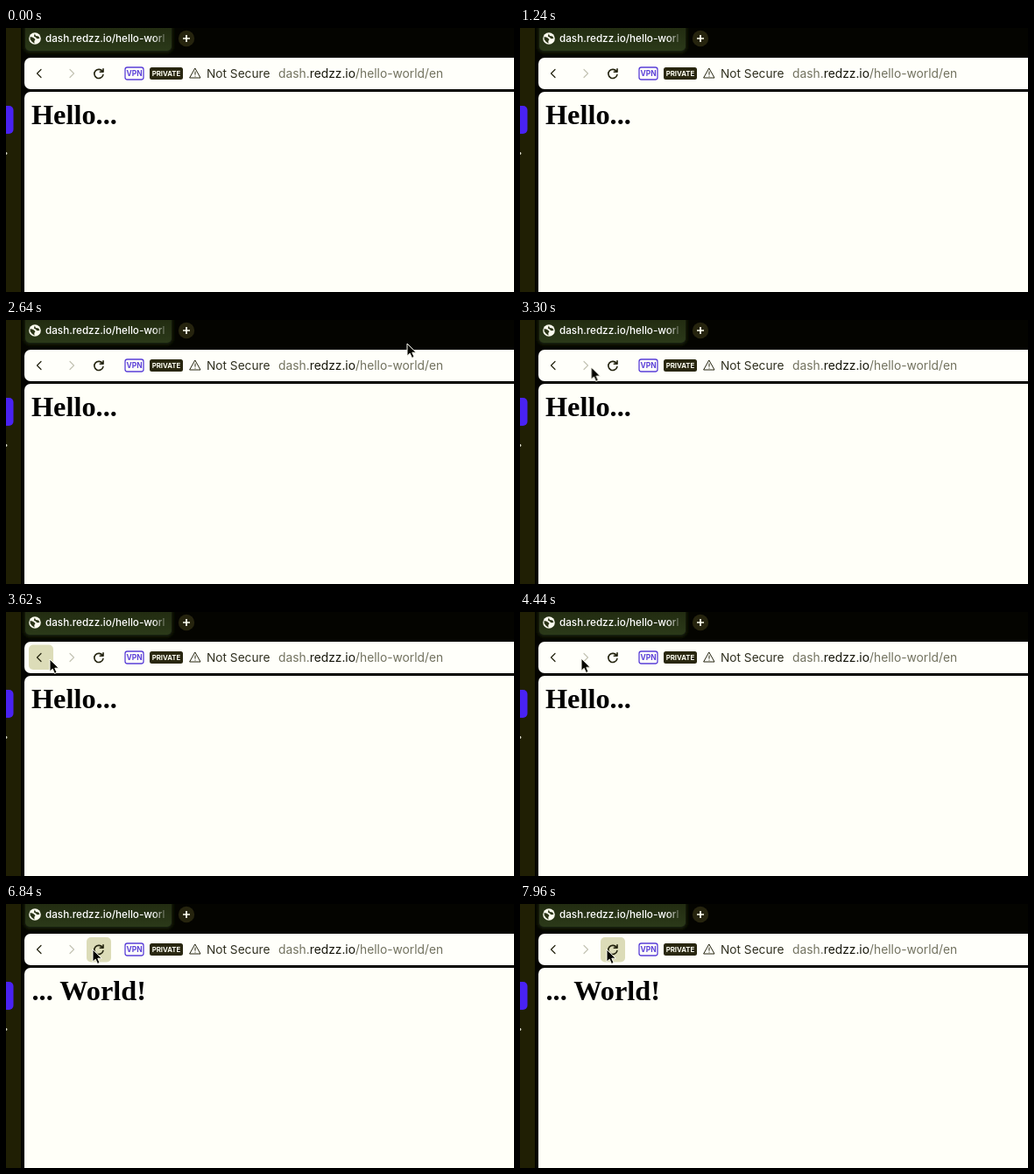
Animation of 580x302 px, one loop 8000 ms. Source, as an HTML page:

```html
<!DOCTYPE html>
<html lang="en">
<head>
<meta charset="utf-8">
<title>Hello World</title>
<style>
  html, body { margin: 0; width: 100%; height: 100%; overflow: hidden; background: #040400; }
  svg { display: block; width: 580px; height: 302px; }
  text { font-family: Inter, sans-serif; white-space: pre; }
  .heading { font: bold 32.3px "Liberation Serif", serif; }
  .line { fill: none; stroke: #24240f; stroke-width: 1.2; stroke-linecap: round; stroke-linejoin: round; }

  .hello, .world, .back, .reload, .cursor { animation: 8s step-end infinite; }
  .hello { animation-name: hello; }
  .world { animation-name: world; }
  .back { animation-name: back; }
  .reload { animation-name: reload; }
  .cursor { animation-name: cursor; animation-timing-function: linear; }

  @keyframes hello { 0% { opacity: 1; } 69%, 100% { opacity: 0; } }
  @keyframes world { 0% { opacity: 0; } 69%, 100% { opacity: 1; } }
  @keyframes back {
    0% { opacity: 0; }
    43.25% { opacity: 1; }
    52.25%, 100% { opacity: 0; }
  }
  @keyframes reload {
    0% { opacity: 0; fill: #dcdcb8; }
    39.5% { opacity: 1; fill: #dcdcb8; }
    40.75% { opacity: 0; fill: #dcdcb8; }
    57.5% { opacity: 1; fill: #dcdcb8; }
    66.25% { opacity: 1; fill: #dcf3b4; }
    69%, 100% { opacity: 1; fill: #dcdcb8; }
  }
  @keyframes cursor {
    0%, 28% { transform: translate(510px, 310px); }
    30.5% { transform: translate(488px, 130px); }
    32.5%, 33% { transform: translate(458px, 27px); animation-timing-function: ease-in-out; }
    41.75% { transform: translate(79px, 54px); animation-timing-function: ease-out; }
    44.5%, 51.5% { transform: translate(50px, 54px); animation-timing-function: ease-in-out; }
    60.5%, 100% { transform: translate(99px, 52px); }
  }
</style>
</head>
<body>
<svg viewBox="0 0 580 302">
  <defs>
    <linearGradient id="fade" gradientUnits="userSpaceOnUse" x1="168" x2="186" y1="0" y2="0">
      <stop stop-color="#fff"/>
      <stop offset="1" stop-color="#fff" stop-opacity="0"/>
    </linearGradient>
    <linearGradient id="tab" x2="0" y2="1">
      <stop stop-color="#20280f"/>
      <stop offset="1" stop-color="#2b3919"/>
    </linearGradient>
    <filter id="glow" x="-10%" y="-40%" width="120%" height="180%"><feGaussianBlur stdDeviation="2"/></filter>
  </defs>

  <rect width="580" height="302" fill="#040400"/>
  <rect width="17" height="302" fill="#201f04"/>
  <rect x="-10" y="89" width="18.5" height="32" rx="5" fill="#4922f3"/>
  <circle cx="0" cy="143.5" r="1.4" fill="#ddddcc"/>

  <!-- tab strip -->
  <rect x="21" y="-8" width="169" height="36" rx="6" fill="#1d2810" filter="url(#glow)"/>
  <rect x="22" y="-8" width="167" height="34" rx="5" fill="url(#tab)"/>
  <circle cx="33" cy="12" r="6.8" fill="#fbfbef"/>
  <path d="M27.6 10l3.2.8 2.7 2.2-1.2 1.9.2 2.8-2.8-1.9-2.1-2.7zM32.8 6.6l1.2 2.4 3.2.6 1.2 2.5-3 .1-1.7-1.7-1.9-.9z" fill="#2b3518"/>
  <text x="45" y="16.3" font-size="11.7" font-weight="500" fill="url(#fade)">dash.redzz.io/hello-worl</text>
  <circle cx="206" cy="12" r="9.2" fill="#26240e"/>
  <path d="M202 12h8M206 8v8" stroke="#fffff4" stroke-width="1.7"/>

  <!-- toolbar -->
  <path d="M580 34H28a7 7 0 0 0-7 7v22a7 7 0 0 0 7 7h552z" fill="#fffffa"/>
  <rect class="back" x="26" y="37.5" width="28" height="28.5" rx="5" fill="#dcdcb8"/>
  <rect class="reload" x="92" y="38" width="28" height="28.5" rx="5"/>
  <path class="line" d="M40 47.5l-4.5 4.5 4.5 4.5"/>
  <path class="line" d="M73 47.5l4.5 4.5-4.5 4.5" style="stroke:#c4c4b4"/>
  <path class="line" d="M110.3 49.8a5.1 5.1 0 1 0 .6 3.8M111 46.7v3.6h-3.7" style="stroke-width:1.6"/>
  <rect x="136" y="45" width="21" height="14" rx="2.5" fill="#fffffa" stroke="#5a3fd8" stroke-width="1.3"/>
  <text x="146.5" y="55.1" font-size="8.4" font-weight="700" fill="#5a3fd8" text-anchor="middle">VPN</text>
  <rect x="164" y="45" width="38" height="14" rx="2.5" fill="#29270f"/>
  <text x="183" y="54.8" font-size="7.8" font-weight="700" fill="#fffff4" text-anchor="middle">PRIVATE</text>
  <path class="line" d="M216 46.3l6 10.7h-12zM216 50v3.2M216 55.1v.1" style="stroke-width:1"/>
  <text x="229" y="57" font-size="13.7" fill="#303020">Not Secure</text>
  <text x="311" y="57" font-size="13.82" fill="#72725f">dash.<tspan fill="#15150a">redzz.io</tspan>/hello-world/en</text>

  <!-- page -->
  <path d="M580 73H28a7 7 0 0 0-7 7v222h559z" fill="#fffff8"/>
  <text class="heading hello" x="29" y="110">Hello...</text>
  <text class="heading world" x="29.5" y="110">... World!</text>

  <path class="cursor" d="M0 0v14.2l3.2-3 2.3 5.2 2.6-1.1-2.3-5.1h4.5z" fill="#050500" stroke="#fffff4" stroke-width="1" stroke-linejoin="round"/>
</svg>
</body>
</html>
```
